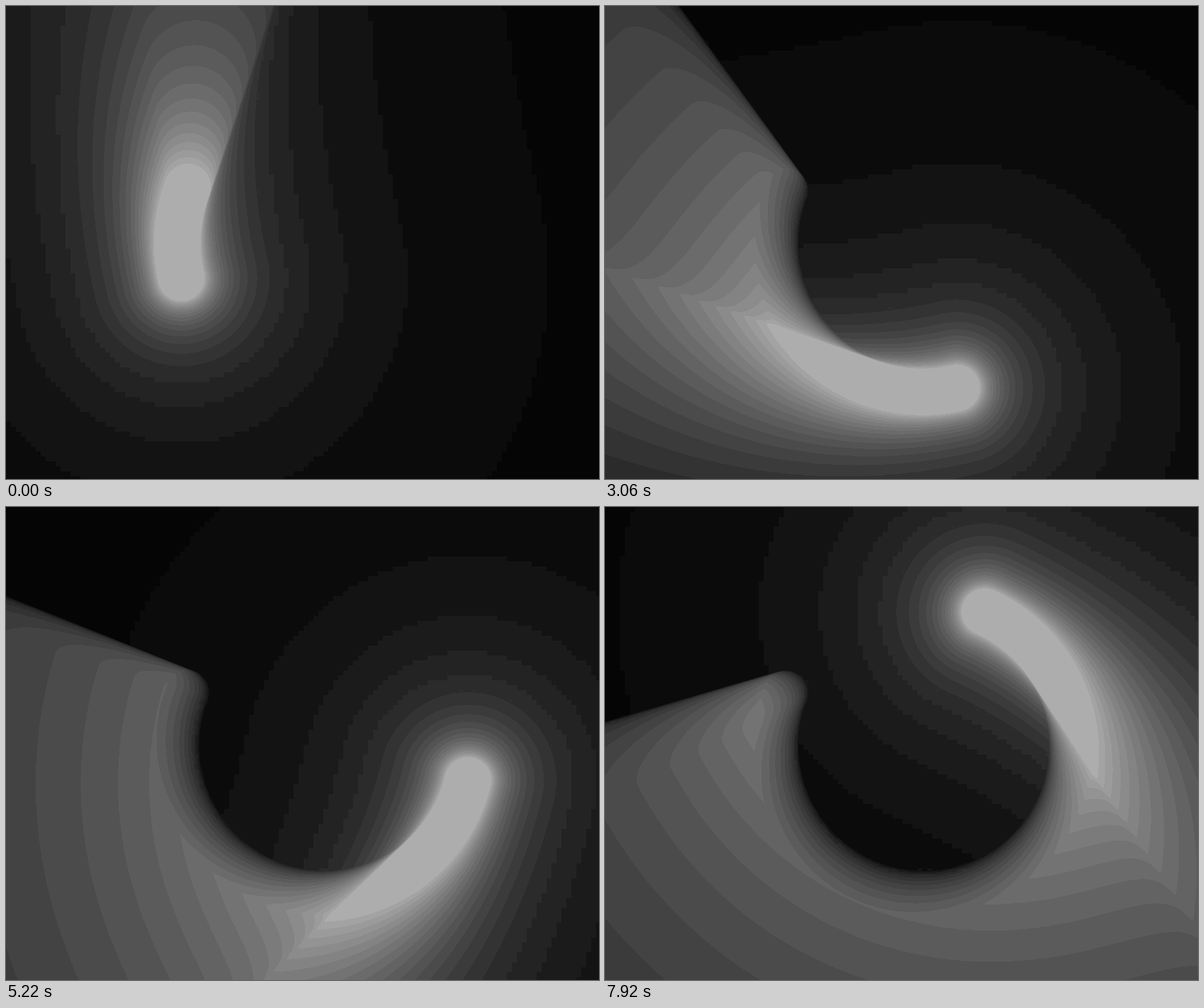
These frames come from a looping animation (837x669 px, 8000 ms). An HTML page with a canvas:

```html
<!DOCTYPE html>
<html>
<head>
<meta charset="utf-8">
<title>Light sweep</title>
<style>
  html, body { margin: 0; width: 100%; height: 100%; overflow: hidden; background: #050505; }
  canvas { display: block; }
</style>
</head>
<body>
<canvas id="stage" width="837" height="669"></canvas>
<script>
const W = 837, H = 669, LOOP = 8000;
const CX = 450, CY = 337.5, ORBIT = 208, R = 31.3;   // path and brush
const START = -21.2, FIRST = 13.1, SPEED = 29.35;    // degrees, degrees per second
const RAYS = 3000, BLOCK = 7;
const RAD = Math.PI / 180, TAU = Math.PI * 2;

const ctx = document.getElementById('stage').getContext('2d');
const image = ctx.createImageData(W, H);
const pixels = new Uint32Array(image.data.buffer);
const raw = new Float32Array(W * H);
const prefix = new Float32Array((RAYS + 1) * 900);
const cache = [];

// start time of every step
const times = [0, 150, 330, 510, 690, 860, 1040, 1220, 1400];
for (let t = 1560; t <= 2520; t += 160) times.push(t);
for (let t = 2700; t < LOOP; t += 180) times.push(t);

const clamp = v => v < 0 ? 0 : v > 1 ? 1 : v;
const onPath = deg => ({ x: CX - ORBIT * Math.cos(deg * RAD), y: CY + ORBIT * Math.sin(deg * RAD) });
const tail = onPath(START);

// linear light fraction -> sRGB grey, full light is 173
const shades = Float32Array.from({ length: 4097 }, (_, i) => {
  const v = 0.417 * (i / 4096) ** 2;
  return 255 * (v <= 0.0031308 ? 12.92 * v : 1.055 * v ** (1 / 2.4) - 0.055);
});

function level(c) {
  if (c < 5) return 5;
  if (c >= 165) return 173;
  return 11 + 8 * Math.floor((c - 5) / 8);
}

// how much of the point is covered by the stroke from the tail to the head
function coverage(x, y, head, span) {
  const dx = CX - x, dy = y - CY;
  const gap = R + 0.5 - Math.abs(Math.hypot(dx, dy) - ORBIT);
  if (gap <= 0) return 0;
  const turn = ((Math.atan2(dy, dx) / RAD - START) % 360 + 360) % 360;
  if (turn <= span) return clamp(gap);
  const d = Math.min(Math.hypot(x - head.x, y - head.y), Math.hypot(x - tail.x, y - tail.y));
  return clamp(R + 0.5 - d);
}

// distance-weighted cover along each ray leaving the head
function castRays(head, span) {
  const reach = Math.ceil(Math.hypot(Math.max(head.x, W - head.x), Math.max(head.y, H - head.y))) + 2;
  const row = reach + 1;
  for (let a = 0; a <= RAYS; a++) {
    const ux = Math.cos(a / RAYS * TAU), uy = Math.sin(a / RAYS * TAU);
    let sum = 0, k = a * row;
    prefix[k] = 0;
    for (let d = 0; d < reach; d++) {
      const m = d + 0.5, x = head.x + ux * m, y = head.y + uy * m;
      if (x > -2 && y > -2 && x < W + 2 && y < H + 2) {
        sum += 2 * m * coverage(x, y, head, span);
      }
      prefix[++k] = sum;
    }
  }
  return row;
}

function render(time) {
  const deg = FIRST + SPEED * time / 1000;
  const head = onPath(deg);
  const row = castRays(head, deg - START);
  for (let y = 0, i = 0; y < H; y++) {
    for (let x = 0; x < W; x++, i++) {
      const dx = x + 0.5 - head.x, dy = y + 0.5 - head.y, d = Math.sqrt(dx * dx + dy * dy);
      let light = 1;
      if (d > 2) {
        let a = Math.atan2(dy, dx) / TAU;
        if (a < 0) a += 1;
        a *= RAYS;
        const a0 = Math.min(a | 0, RAYS - 1), fa = a - a0, d0 = d | 0, fd = d - d0;
        const k = a0 * row + d0, n = k + row;
        const near = prefix[k] + (prefix[k + 1] - prefix[k]) * fd;
        const next = prefix[n] + (prefix[n + 1] - prefix[n]) * fd;
        light = Math.min(1, (near + (next - near) * fa) / (d * d));
      }
      raw[i] = shades[Math.round(Math.sqrt(light) * 4096)];
    }
  }
  // dim areas fall into coarse blocks
  const out = new Uint8Array(W * H), mid = BLOCK >> 1;
  for (let y = 0, i = 0; y < H; y++) {
    const by = Math.min(H - 1, y - y % BLOCK + mid);
    for (let x = 0; x < W; x++, i++) {
      let c = raw[i];
      if (c < 44) {
        const b = raw[by * W + Math.min(W - 1, x - x % BLOCK + mid)];
        if (Math.abs(b - c) < 4) c = b;
      }
      out[i] = level(c);
    }
  }
  return out;
}

function drawPointer(x, y) {
  const shape = new Path2D('M0 0V14.5L3.3 11.4L5.5 16.4L7.7 15.4L5.6 10.5H10Z');
  ctx.save();
  ctx.translate(x, y);
  ctx.strokeStyle = '#000';
  ctx.lineWidth = 1.4;
  ctx.stroke(shape);
  ctx.fillStyle = '#fff';
  ctx.fill(shape);
  ctx.restore();
}

let shown = -1;
function tick() {
  const t = performance.now() % LOOP;
  let step = times.length - 1;
  while (times[step] > t) step--;
  if (step !== shown) {
    shown = step;
    const grey = cache[step] || (cache[step] = render(times[step]));
    for (let i = 0; i < grey.length; i++) pixels[i] = 0xff000000 | grey[i] * 0x010101;
    ctx.putImageData(image, 0, 0);
    if (times[step] === 1560) drawPointer(823, 160);
    if (times[step] === 1720) drawPointer(807, 157);
  }
  requestAnimationFrame(tick);
}
tick();
</script>
</body>
</html>
```
